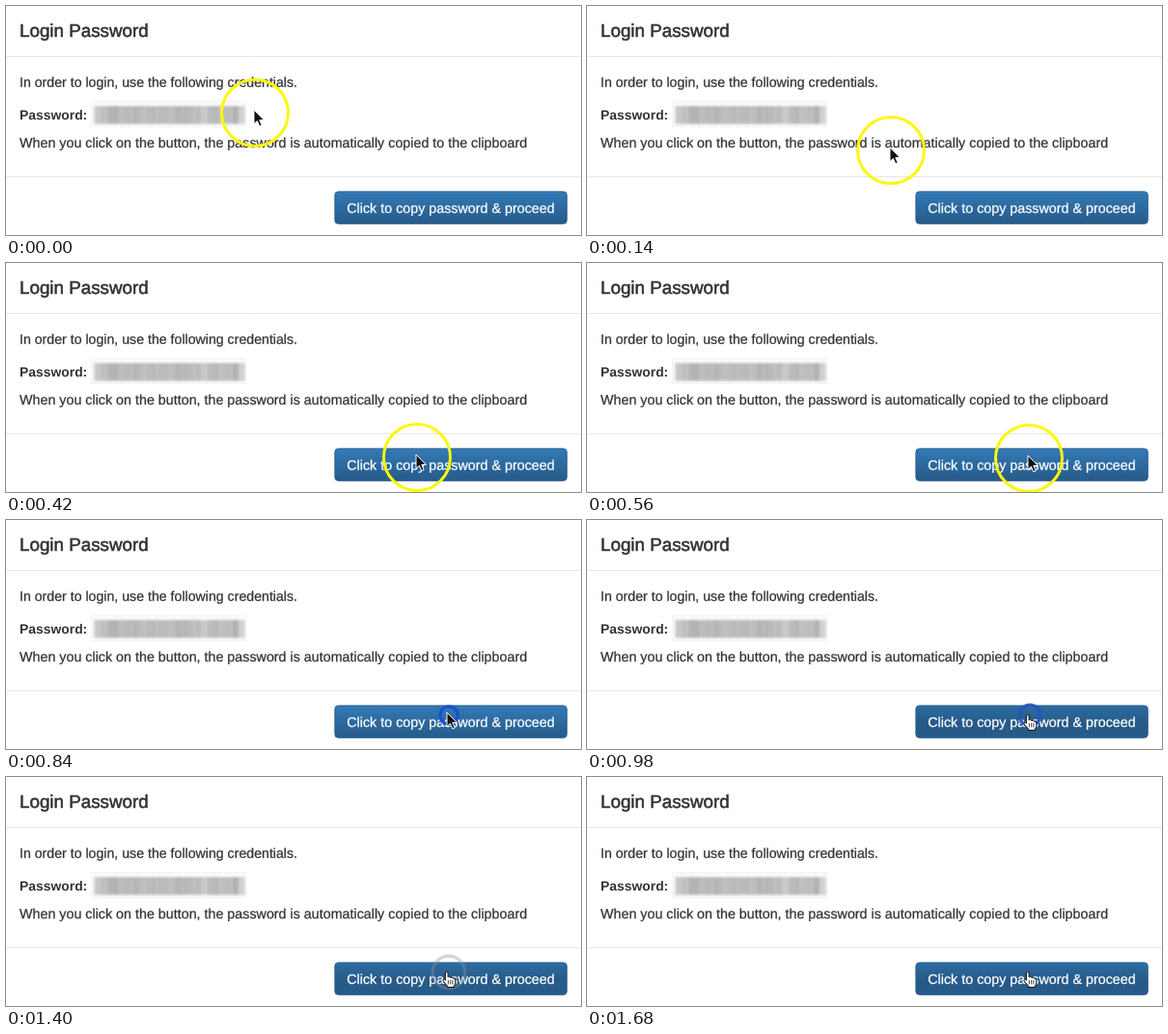
Animation, 596 px wide and 238 px high, one loop 2.06 s. Source, as an HTML page:

```html
<!DOCTYPE html>
<html lang="en">
<head>
<meta charset="utf-8">
<title>Login Password</title>
<style>
  html, body { margin: 0; width: 100%; height: 100%; overflow: hidden; background: #fff; }
  svg { display: block; width: 596px; height: 238px; }
  text {
    font-family: "Liberation Sans", Arial, sans-serif;
    font-size: 14.3px;
    fill: #333;
    stroke: #333;
    stroke-width: .25px;
    text-rendering: geometricPrecision;
  }
  .title { font-size: 18.8px; stroke-width: .55px; }
  .intro { font-size: 14.16px; }
  .label { font-size: 13.9px; font-weight: bold; stroke: none; }
  .caption { fill: #fff; stroke: #fff; }
</style>
</head>
<body>
<svg viewBox="0 0 596 238">
  <defs>
    <linearGradient id="idle" x2="0" y2="1">
      <stop stop-color="#337ab7"/>
      <stop offset="1" stop-color="#265a88"/>
    </linearGradient>
    <linearGradient id="hover" x2="0" y2="1">
      <stop stop-color="#2d6ca2"/>
      <stop offset=".56" stop-color="#265a88"/>
    </linearGradient>
    <filter id="soft" x="-10%" y="-30%" width="120%" height="160%">
      <feGaussianBlur stdDeviation="1.3"/>
    </filter>
  </defs>

  <rect width="596" height="238" fill="#fff"/>
  <path d="M0 52.5H596M0 177.5H596" stroke="#e7e7e7"/>

  <text class="title" x="14" y="32">Login Password</text>
  <text class="intro" x="14" y="84">In order to login, use the following credentials.</text>
  <text class="label" x="14" y="118">Password:</text>
  <text x="14" y="147">When you click on the button, the password is automatically copied to the clipboard</text>

  <rect x="88.5" y="99.5" width="160" height="26" fill="#fafafa" stroke="#f3f3f3"/>
  <g id="mosaic" filter="url(#soft)"></g>

  <rect id="button" x="340.9" y="192.9" width="240.4" height="33.4" rx="3.5" stroke="#2a6090"/>
  <text class="caption" x="353.3" y="215">Click to copy password &amp; proceed</text>

  <circle id="halo" r="34.5" fill="none" stroke="#fbf80c" stroke-width="3"/>
  <circle id="ripple" cx="459" cy="203" fill="none" stroke-width="3.2"/>

  <path id="arrow" d="M0 0V14.6L3.4 11.5L5.8 17L8.2 16L5.8 10.6H10.4Z"
        fill="#111" stroke="#fff" stroke-width="1" stroke-linejoin="round"/>
  <g id="hand" transform="translate(452.4 202)" stroke="#111" stroke-linejoin="round" stroke-linecap="round">
    <path d="M3 9V2Q3 .5 4.3 .5T5.7 2V6Q7.5 4.8 8.3 6.5Q10 5.6 10.7 7.2Q13.4 6.6 13.4 9V11.5Q13.4 13.5 12 15V16.5H5.2V15.2L1 10.5Q0 8.8 1.2 8.2T3 9Z" fill="#fff"/>
    <path d="M6 9.5V13M8.3 9.5V13M10.5 9.5V13" stroke-width=".8" fill="none"/>
  </g>
</svg>
<script>
  const LOOP = 2060, STEP = 140, LAST = 12;
  const $ = id => document.getElementById(id);
  const set = (id, attrs) => {
    for (const key in attrs) $(id).setAttribute(key, attrs[key]);
  };
  const show = (id, on) => set(id, { visibility: on ? "visible" : "hidden" });

  // Halo centre on each step of the approach
  const path = [[258, 111], [315, 150], [368, 182], [426, 202], [458, 203], [458, 203]];

  // Radius, colour and opacity of the click ripple, from step 6 on
  const ripples = [
    [9.2, "#1c4ed0", 1],
    [10.8, "#2453c0", .9],
    [12.6, "#3a60ae", .72],
    [14.6, "#66799a", .5],
    [16.8, "#8c9298", .38],
    [19, "#a0a0a0", .14]
  ];

  // Blurred password: soft grey columns with pale gaps near the end
  function drawMosaic() {
    let seed = 7;
    const random = () => (seed = seed * 16807 % 2147483647) / 2147483647;
    const cell = 6.5;
    for (let col = 0; col < 24; col++) {
      const pale = [0, 17, 23].includes(col) ? 24 : 0;
      const grey = Math.round(176 + random() * 16 + pale);
      const rect = document.createElementNS("http://www.w3.org/2000/svg", "rect");
      rect.setAttribute("x", 91.5 + col * cell);
      rect.setAttribute("y", 104);
      rect.setAttribute("width", cell);
      rect.setAttribute("height", 18.5);
      rect.setAttribute("fill", `rgb(${grey},${grey},${grey})`);
      $("mosaic").append(rect);
    }
  }

  function render(step) {
    const [x, y] = path[Math.min(step, path.length - 1)];
    const hovering = step >= 7;
    const ripple = ripples[step - path.length];

    show("halo", step < path.length);
    set("halo", { cx: x, cy: y });
    show("arrow", !hovering);
    set("arrow", { transform: `translate(${x - 1} ${y - 3})` });
    show("hand", hovering);
    set("button", { fill: hovering ? "url(#hover)" : "url(#idle)" });

    show("ripple", ripple);
    if (ripple) {
      const [r, stroke, opacity] = ripple;
      set("ripple", { r, stroke, opacity });
    }
  }

  let start;
  function tick(now) {
    start ??= now;
    render(Math.min(LAST, Math.floor((now - start) % LOOP / STEP)));
    requestAnimationFrame(tick);
  }

  drawMosaic();
  render(0);
  requestAnimationFrame(tick);
</script>
</body>
</html>
```
